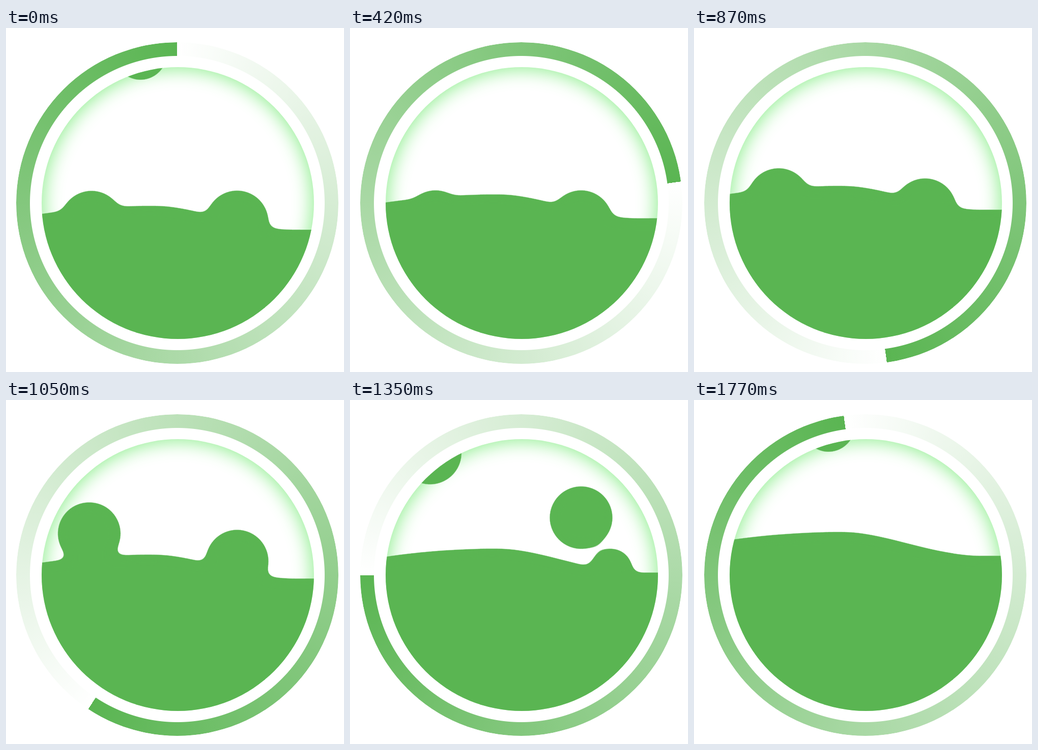
Write an HTML page that moves like this. It is 664 px wide and 677 px high and loops after 1800 ms.

```html
<!DOCTYPE html>
<html lang="en">
<head>
<meta charset="utf-8">
<title>Liquid loader</title>
<style>
  html, body { margin: 0; width: 100%; height: 100%; overflow: hidden; background: #fff; }
  .stage { position: relative; width: 664px; height: 677px; overflow: hidden; }
  .ring, .glass { position: absolute; border-radius: 50%; }
  .ring {
    --turn: 0deg;
    left: 20px; top: 28px; width: 633px; height: 633px;
    background: conic-gradient(from var(--turn), #fff, #5ab552);
    -webkit-mask: radial-gradient(closest-side, transparent 289px, #000 290px);
    mask: radial-gradient(closest-side, transparent 289px, #000 290px);
  }
  .glass {
    left: 70px; top: 77px; width: 535px; height: 535px;
    box-shadow: inset 0 0 36px 4px lightgreen;
  }
  svg { position: absolute; left: 0; top: 0; }
</style>
</head>
<body>
<div class="stage">
  <div class="ring" id="ring"></div>
  <div class="glass"></div>
  <svg width="664" height="677" viewBox="0 0 664 677">
    <defs>
      <clipPath id="round"><circle cx="337.5" cy="344.5" r="267.5"/></clipPath>
      <filter id="goo" filterUnits="userSpaceOnUse" x="-60" y="-60" width="784" height="797"
              color-interpolation-filters="sRGB">
        <feGaussianBlur stdDeviation="10"/>
        <feColorMatrix values="1 0 0 0 0  0 1 0 0 0  0 0 1 0 0  0 0 0 19 -9"/>
      </filter>
    </defs>
    <g clip-path="url(#round)">
      <g id="liquid" filter="url(#goo)" fill="#5ab552">
        <path id="wave" d="M20 373 L70 365.8 C150 354.3 230 349.3 300 350.1
          C375 352.3 470 395.3 560 397.1 L660 396.8 V800 H20 Z"/>
      </g>
    </g>
  </svg>
</div>
<script>
  const STEP = 30, COUNT = 60, TOP = 358;

  // [step, value] pairs, straight lines between them
  const LEVEL = [[0, 0], [14, 22.5], [23, 29.5], [29, 39.3], [40, 51], [45, 57.4],
                 [50, 71], [54, 78], [59, 90.3], [60, 92.5]];
  const RISE = [[0, 0], [14, 0.5], [17, 19], [20, 76], [23, 172], [27, TOP],
                [27.01, 3], [29, 24], [40, 98], [50, 202], [54, TOP], [54.01, 0], [60, 0]];

  // x and y at rest, radius, speed, sideways drift per pixel climbed
  const BUBBLES = [
    { x: 168, y: 382, r: 62.3, speed: 1.85, drift: 0.038 },
    { x: 454, y: 381.5, r: 62.3, speed: 1, drift: 0 },
    { x: 269, y: 587, r: 52.8, speed: 1.5, drift: 0.009, late: true },
    { x: 538, y: 559.5, r: 42.7, speed: 1.5, drift: 0.111, late: true }
  ];

  const ring = document.getElementById('ring');
  const wave = document.getElementById('wave');
  const liquid = document.getElementById('liquid');

  for (const b of BUBBLES) {
    b.node = document.createElementNS('http://www.w3.org/2000/svg', 'circle');
    b.node.setAttribute('r', b.r);
    liquid.append(b.node);
  }

  function track(keys, n) {
    const i = Math.max(1, keys.findIndex(k => k[0] >= n));
    const [a, u] = keys[i - 1], [b, v] = keys[i];
    return u + (v - u) * (n - a) / (b - a);
  }

  // Each quarter turn starts fast, slows in the middle and speeds up again
  function turn(n) {
    const a = 360 * n / COUNT;
    return a + 4.14 * Math.sin(a * 4 * Math.PI / 180);
  }

  function draw(n) {
    const rise = track(RISE, n);
    const lateRise = n >= 54 || n < 3 ? TOP : rise;
    ring.style.setProperty('--turn', turn(n) + 'deg');
    wave.setAttribute('transform', `translate(0 ${-track(LEVEL, n)})`);
    for (const b of BUBBLES) {
      const climb = b.speed * (b.late ? lateRise : rise);
      b.node.setAttribute('cx', b.x - b.drift * climb);
      b.node.setAttribute('cy', b.y - climb);
    }
  }

  const start = performance.now();
  let last = 0;
  function tick() {
    const n = Math.floor(Math.max(0, performance.now() - start) / STEP) % COUNT;
    if (n !== last) draw(last = n);
    requestAnimationFrame(tick);
  }
  draw(0);
  requestAnimationFrame(tick);
</script>
</body>
</html>
```
